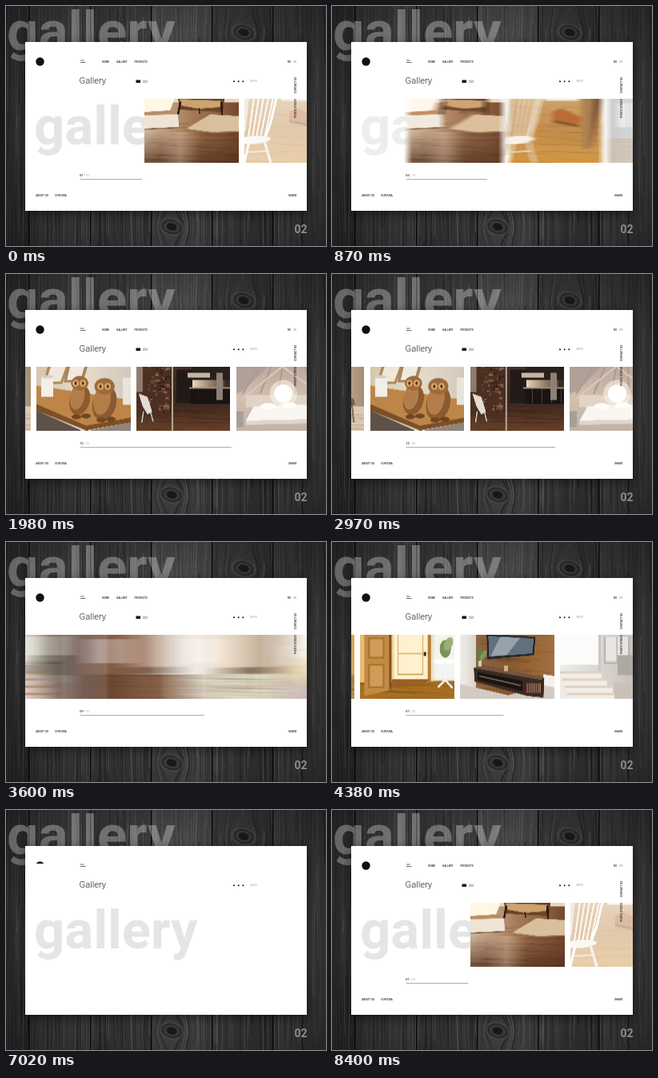
These frames come from a looping animation (400 by 300 pixels, 8.43 s). An HTML page with a canvas:

```html
<!DOCTYPE html>
<html lang="en">
<head>
<meta charset="utf-8">
<title>Gallery</title>
<style>
html, body { margin: 0; width: 100%; height: 100%; overflow: hidden; background: #222; }
canvas { display: block; width: 400px; height: 300px; }
</style>
</head>
<body>
<canvas id="stage" width="400" height="300"></canvas>
<script>
const LOOP = 8430;
const CARD = { x: 24, y: 45, w: 352, h: 211 };
const ITEM_W = 117.5, ITEM_H = 80, PITCH = 124.8, TOP = 115.5;
const START_X = 173, ACTIVE_X = 162.7;
const PAD = 60, SCALE = 3;
const FONT = 'Roboto, Arial, sans-serif';
const ctx = document.getElementById('stage').getContext('2d');

const clamp = v => Math.max(0, Math.min(1, v));
const span = (t, a, b) => clamp((t - a) / (b - a));
const mix = (a, b, k) => a + (b - a) * k;
const easeOut = p => 1 - Math.pow(1 - p, 3);
const inOut = (p, n) => p < .5 ? .5 * Math.pow(2 * p, n) : 1 - .5 * Math.pow(2 - 2 * p, n);

function layer(w, h) {
  const c = document.createElement('canvas');
  c.width = w;
  c.height = h;
  return c;
}

function random(seed) {
  return () => (seed = (seed * 16807) % 2147483647) / 2147483647;
}

// ---- drawing helpers ----
function rect(c, color, x, y, w, h) {
  c.fillStyle = color;
  c.fillRect(x, y, w, h);
}
function poly(c, color, ...p) {
  c.fillStyle = color;
  c.beginPath();
  for (let i = 0; i < p.length; i += 2) c.lineTo(p[i], p[i + 1]);
  c.fill();
}
function oval(c, color, x, y, rx, ry, turn = 0) {
  c.fillStyle = color;
  c.beginPath();
  c.ellipse(x, y, rx, ry, turn, 0, 7);
  c.fill();
}
function line(c, color, width, ...p) {
  c.strokeStyle = color;
  c.lineWidth = width;
  c.beginPath();
  for (let i = 0; i < p.length; i += 2) c.lineTo(p[i], p[i + 1]);
  c.stroke();
}
function fade(c, x, y, w, h, across, ...colors) {
  const g = across ? c.createLinearGradient(x, 0, x + w, 0) : c.createLinearGradient(0, y, 0, y + h);
  colors.forEach((col, i) => g.addColorStop(i / (colors.length - 1), col));
  rect(c, g, x, y, w, h);
}
function boards(c, y, color, seed) {
  const rnd = random(seed);
  for (let i = 0; i < 26; i++) {
    const yy = y + rnd() * (80 - y), x = rnd() * 100 - 20;
    c.globalAlpha = .08 + rnd() * .2;
    line(c, color, .6 + rnd(), x, yy, x + 30 + rnd() * 60, yy + 2);
  }
  c.globalAlpha = 1;
}

// ---- the pictures of the strip ----
function rugRoom(c) {
  fade(c, 0, 0, 118, 80, true, '#d9c4aa', '#a67a56', '#76492d');
  fade(c, 0, 36, 118, 44, false, 'rgba(90,50,28,0)', 'rgba(82,46,27,.75)');
  boards(c, 30, '#3c2113', 11);
  rect(c, '#e6d6bd', 0, 0, 118, 5);
  poly(c, '#fff6e4', 0, 0, 38, 0, 32, 15, 0, 17);
  poly(c, '#b98c63', 0, 17, 34, 15, 42, 22, 0, 21);
  poly(c, '#eee4d6', 0, 21, 42, 20, 43, 36, 0, 38);
  line(c, '#7d5236', 1.4, 0, 38.5, 43, 36.5);
  poly(c, '#6b4326', 42, 0, 100, 0, 98, 17, 44, 14);
  poly(c, '#caa36f', 44, 1, 96, 3, 94, 11, 68, 13, 46, 9);
  line(c, '#2d1a10', 2.4, 45, 4, 42, 20);
  line(c, '#2d1a10', 2.4, 96, 4, 97, 22);
  line(c, '#2d1a10', 1.6, 68, 12, 69, 19);
  poly(c, '#d9bf9c', 52, 38, 82, 20, 118, 22, 118, 41, 84, 42);
  line(c, '#a67c55', 1.2, 52, 38.5, 84, 42.5, 118, 41.5);
  fade(c, 20, 42, 50, 38, true, 'rgba(255,235,210,0)', 'rgba(255,235,210,.3)', 'rgba(255,235,210,0)');
}
function chairRoom(c) {
  fade(c, 0, 0, 118, 80, false, '#cda066', '#c08a48', '#d0943f');
  boards(c, 8, '#7c4d1c', 23);
  poly(c, '#b5682f', 56, 17, 66, 12, 92, 24, 88, 33, 56, 27);
  poly(c, '#80502a', 56, 27, 88, 33, 88, 36, 56, 30);
  poly(c, '#a8794d', 92, 0, 112, 0, 104, 62, 94, 64);
  poly(c, '#7b5433', 106, 0, 118, 0, 104, 62);
  rect(c, '#efe6d8', 46, 0, 42, 3);
  poly(c, '#dcd4c6', 0, 0, 6, 0, 2, 40, 0, 42);
  for (let i = 0; i < 5; i++) line(c, '#f7f4ee', 2, 12 + i * 6, 0, 5 + i * 5, 50);
  line(c, '#fff', 3, 40, 0, 33, 30, 26, 50);
  oval(c, '#f4f0e9', 12, 52, 21, 5, -.08);
  line(c, '#e9e3d9', 3.4, 25, 53, 33, 80);
  line(c, '#fbf9f5', 3.2, 6, 55, 0, 80);
  line(c, '#ded5c6', 2, 4, 67, 29, 66);
}
function owls(c) {
  fade(c, 0, 0, 118, 80, true, '#d6c6ae', '#e7dccb', '#d2c9bd');
  poly(c, '#b08a5b', 14, 0, 40, 0, 32, 22, 8, 22);
  poly(c, '#efe7da', 18, 0, 37, 0, 30, 19, 12, 19);
  poly(c, '#a8855c', 38, 0, 64, 0, 58, 20, 34, 20);
  poly(c, '#f0e9df', 42, 0, 60, 0, 55, 17, 38, 17);
  poly(c, '#bd8648', 0, 24, 118, 42, 118, 64, 62, 74, 0, 47);
  poly(c, '#7d4f27', 0, 47, 62, 74, 118, 64, 118, 70, 62, 80, 0, 55);
  poly(c, '#5e5148', 0, 55, 56, 80, 0, 80);
  poly(c, '#8f857b', 66, 80, 118, 70, 118, 80);
  rect(c, '#f2eee8', 6, 13, 15, 25);
  oval(c, '#d8d0c5', 13.5, 13, 7.5, 2);
  rect(c, '#e8e3db', 108, 14, 10, 34);
  for (const [x, y, s] of [[54, 34, .9], [85, 38, 1.05]]) {
    oval(c, '#8a5a30', x, y + 8, 14 * s, 21 * s, .25);
    oval(c, '#b27d48', x - 3, y + 4, 10 * s, 18 * s, .2);
    oval(c, '#9d6a3a', x, y - 13, 12 * s, 10 * s);
    oval(c, '#d3a46c', x - 5, y - 13, 4, 4.5);
    oval(c, '#d3a46c', x + 4, y - 13, 4, 4.5);
    oval(c, '#4a2c16', x - 5, y - 13, 1.5, 1.8);
    oval(c, '#4a2c16', x + 4, y - 13, 1.5, 1.8);
    oval(c, '#70451f', x - 4, y + 29, 6, 3);
    oval(c, '#70451f', x + 8, y + 28, 6, 3);
  }
}
function kitchen(c) {
  fade(c, 0, 0, 118, 80, false, '#443029', '#38251d', '#694128');
  boards(c, 48, '#27140c', 31);
  poly(c, '#4b2f22', 0, 0, 42, 0, 42, 68, 0, 60);
  const rnd = random(7);
  for (let i = 0; i < 60; i++) {
    const tone = ['#8a6248', '#33201a', '#6c4733'][i % 3];
    rect(c, tone, 12 + rnd() * 26, rnd() * 56, 2 + rnd() * 4, 1 + rnd() * 3);
  }
  rect(c, '#8f7b6b', 0, 0, 8, 32);
  rect(c, '#b6a594', 44, 0, 2, 80);
  rect(c, '#221a18', 50, 4, 22, 42);
  rect(c, '#27201d', 70, 0, 48, 17);
  fade(c, 70, 17, 40, 9, true, '#e9dbc4', '#a48a70', '#5d4637');
  rect(c, '#c6b5a2', 64, 8, 28, 6);
  rect(c, '#191312', 68, 27, 50, 20);
  rect(c, '#a59586', 66, 26, 52, 1.6);
  for (let x = 78; x < 118; x += 12) line(c, '#5c4a41', .6, x, 28, x, 46);
  rect(c, '#8d8177', 100, 8, 8, 34);
  poly(c, '#e3ddd5', 3, 34, 14, 38, 20, 57, 14, 60, 8, 50);
  line(c, '#cfc6bc', 1.5, 9, 56, 7, 70);
  line(c, '#cfc6bc', 1.5, 18, 57, 21, 69);
}
function bedroom(c) {
  fade(c, 0, 0, 118, 80, false, '#6d4328', '#9b7250', '#7a563a');
  poly(c, '#4f2f1c', 0, 0, 40, 0, 10, 30, 0, 34);
  for (let i = 0; i < 6; i++) line(c, '#3e2415', 2, 30 + i * 14, 0, 8 + i * 22, 34);
  line(c, '#b88a5e', 2, 58, 0, 8, 40);
  line(c, '#b88a5e', 2, 58, 0, 112, 40);
  rect(c, '#bda083', 12, 36, 94, 15);
  oval(c, 'rgba(255,238,205,.55)', 59, 34, 17, 17);
  oval(c, '#fff', 59, 34, 11.5, 11.5);
  poly(c, '#f1e9df', 22, 50, 88, 48, 100, 66, 12, 68);
  poly(c, '#b7a493', 12, 68, 100, 66, 100, 71, 12, 73);
  oval(c, '#fffaf2', 40, 50, 10, 4);
  oval(c, '#fffaf2', 66, 49, 10, 4);
  rect(c, '#3d2819', 0, 56, 9, 20);
}
function doorRoom(c) {
  fade(c, 0, 0, 118, 80, true, '#e8bd70', '#f3dfad', '#e6e6df');
  poly(c, '#a97023', 0, 60, 118, 58, 118, 80, 0, 80);
  boards(c, 60, '#5f3913', 43);
  poly(c, '#c28a43', 5, 0, 36, 0, 36, 70, 5, 77);
  rect(c, '#a87131', 10, 4, 20, 26);
  rect(c, '#d09d57', 12, 6, 16, 22);
  rect(c, '#a87131', 10, 37, 20, 30);
  rect(c, '#d09d57', 12, 39, 16, 26);
  rect(c, '#7d5120', 36, 0, 3, 68);
  rect(c, '#fff1cf', 42, 0, 42, 56);
  line(c, '#d4ac66', 1.4, 47, 0, 47, 50, 78, 50, 78, 0);
  line(c, '#d4ac66', 1.2, 47, 24, 78, 24);
  rect(c, '#b67c37', 84, 0, 4, 60);
  rect(c, '#3b2919', 79, 22, 3, 5);
  poly(c, '#9b5f25', 40, 56, 88, 56, 78, 62, 38, 63);
  rect(c, '#f3f3ef', 92, 0, 26, 56);
  oval(c, '#7c9256', 106, 18, 7, 11);
  oval(c, '#9cae78', 110, 12, 5, 9, .4);
  oval(c, '#fff', 105, 34, 14, 3.4);
  line(c, '#f6f6f3', 2.4, 106, 34, 106, 57, 97, 66);
  line(c, '#f6f6f3', 2.4, 106, 57, 115, 67);
}
function tvRoom(c) {
  fade(c, 0, 0, 118, 80, true, '#8f6c4c', '#87592f', '#a3713f');
  boards(c, 0, '#4b2d16', 59);
  fade(c, 0, 0, 20, 68, true, '#f1eeea', '#d9d3cb');
  poly(c, '#d3cbc3', 0, 62, 60, 76, 118, 60, 118, 80, 0, 80);
  poly(c, '#f4f1ed', 104, 50, 118, 52, 118, 66, 104, 64);
  poly(c, '#1f2226', 33, 0, 94, 3, 92, 26, 34, 31);
  poly(c, '#62717c', 35, 2, 92, 5, 90, 24, 36, 28);
  poly(c, 'rgba(230,238,242,.4)', 50, 3, 75, 4, 58, 26, 38, 27);
  poly(c, '#3a2a21', 17, 42, 28, 38, 105, 54, 104, 79, 84, 77, 18, 59);
  poly(c, '#735540', 17, 42, 28, 38, 105, 54, 101, 57);
  poly(c, '#191412', 22, 47, 78, 58, 78, 71, 22, 57);
  for (let i = 0; i < 8; i++) rect(c, i % 3 ? '#887b72' : '#a44d38', 83 + i * 2.3, 61, 1.5, 12);
  line(c, '#a79788', 1, 24, 52, 76, 64);
  rect(c, '#d8c9b9', 23, 30, 4, 10);
  oval(c, '#667a43', 24, 25, 4, 8);
  oval(c, '#819556', 29, 26, 3, 7, .5);
  rect(c, '#c9b091', 55, 39, 5, 7);
}
function stairs(c) {
  fade(c, 0, 0, 118, 80, true, '#dbd5ce', '#a69a8d', '#61594e');
  rect(c, '#f7f6f3', 0, 0, 50, 38);
  rect(c, '#8d8377', 48, 0, 3, 50);
  rect(c, '#c8c6be', 56, 3, 30, 30);
  line(c, '#675545', 2, 56, 3, 56, 36, 86, 36, 86, 3);
  line(c, '#675545', 1.2, 71, 3, 71, 36);
  rect(c, '#484239', 72, 26, 20, 25);
  for (let i = 0; i < 4; i++) {
    rect(c, '#ba9a76', i * 3, 46 + i * 9, 52 + i * 4, 3);
    rect(c, '#e3d7c9', i * 3, 49 + i * 9, 52 + i * 4, 6);
  }
  rect(c, '#877460', 68, 61, 50, 19);
  rect(c, '#564b3f', 92, 0, 26, 80);
}
function room(tones, floor, seed) {
  return c => {
    fade(c, 0, 0, 118, 80, true, ...tones);
    fade(c, 0, 50, 118, 30, true, floor, tones[1]);
    boards(c, 50, '#4b301e', seed);
    rect(c, 'rgba(255,255,255,.55)', 12, 6, 30, 30);
    line(c, 'rgba(90,65,45,.6)', 1.5, 27, 6, 27, 36);
    poly(c, 'rgba(70,46,30,.55)', 50, 42, 104, 40, 106, 48, 50, 50);
    line(c, 'rgba(70,46,30,.6)', 2, 54, 49, 52, 72);
    line(c, 'rgba(70,46,30,.6)', 2, 102, 47, 104, 70);
  };
}

const pictures = [
  rugRoom, chairRoom,
  room(['#8f989b', '#b5b3ac', '#d8d3ca'], '#9a7a59', 61),
  room(['#b7a084', '#e2d6c4', '#8a6b50'], '#8d6440', 67),
  room(['#d9c9ae', '#b98d55', '#d9a95f'], '#94622f', 71),
  doorRoom, tvRoom, stairs,
  room(['#694630', '#8a6146', '#f1eeea'], '#553320', 73),
  room(['#efede9', '#dac9b4', '#a68d74'], '#d8cabb', 79),
  owls, kitchen, bedroom,
  room(['#bca58c', '#846850', '#ddd2c3'], '#775238', 83)
].map(paint => {
  const pic = layer(ITEM_W * SCALE, ITEM_H * SCALE), c = pic.getContext('2d');
  c.scale(SCALE, SCALE);
  paint(c);
  return pic;
});

// ---- dark boards behind the card ----
function makeWood() {
  const wood = layer(400, 300), c = wood.getContext('2d'), rnd = random(4242);
  const knots = [[297, 33], [207, 276]], seams = [28, 105, 181, 257, 333];
  rect(c, '#414141', 0, 0, 400, 300);
  [0, ...seams].forEach((x, i) => rect(c, i % 2 ? 'rgba(255,255,255,.04)' : 'rgba(0,0,0,.06)', x, 0, 77, 300));
  for (let n = 0; n < 620; n++) {
    const x0 = rnd() * 400, ph = rnd() * 6, y0 = rnd() * 300 - 60, len = 60 + rnd() * 240;
    const tone = rnd() < .55 ? '0,0,0' : '165,165,165';
    c.strokeStyle = `rgba(${tone},${.06 + rnd() * .24})`;
    c.lineWidth = .4 + rnd() * 1.1;
    c.beginPath();
    for (let y = y0; y < y0 + len; y += 5) {
      let x = x0 + Math.sin(y / 45 + ph) * 1.2;
      for (const [kx, ky] of knots) {
        const d = x0 - kx;
        x += Math.sign(d) * 13 * Math.exp(-Math.pow((y - ky) / 18, 2) - Math.abs(d) / 15);
      }
      c.lineTo(x, y);
    }
    c.stroke();
  }
  for (const [x, y] of knots) {
    for (let r = 16; r > 2; r -= 3) oval(c, r % 2 ? 'rgba(20,20,20,.5)' : 'rgba(95,95,95,.4)', x, y, r, r * .7, .25);
    oval(c, '#1c1c1c', x, y, 6, 4, .3);
  }
  for (const x of seams) {
    rect(c, '#0d0d0d', x, 0, 1.6, 300);
    rect(c, 'rgba(255,255,255,.08)', x + 1.6, 0, 1, 300);
  }
  const g = c.createRadialGradient(200, 140, 90, 200, 150, 260);
  g.addColorStop(0, 'rgba(0,0,0,0)');
  g.addColorStop(1, 'rgba(0,0,0,.55)');
  rect(c, g, 0, 0, 400, 300);
  text(c, 'gallery', 1, 55, 69, 'rgba(255,255,255,.3)', 700);
  text(c, '02', 360.5, 283.5, 14, '#8c8c8c', 700);
  c.shadowColor = 'rgba(0,0,0,.55)';
  c.shadowBlur = 14;
  c.shadowOffsetY = 4;
  rect(c, '#fff', CARD.x, CARD.y, CARD.w, CARD.h);
  return wood;
}
function text(c, s, x, y, size, color, weight = 400) {
  c.font = `${weight} ${size}px ${FONT}`;
  c.fillStyle = color;
  c.fillText(s, x, y);
}
const wood = makeWood();

// ---- motion ----
const FIRST = START_X - ACTIVE_X + 11 * PITCH, SECOND = START_X - ACTIVE_X + 6 * PITCH;
function scrollAt(t) {
  if (t >= 5400) return t < 6600 ? SECOND : 0;
  return t < 2340 ? FIRST * inOut(t / 2340, 7.4)
    : mix(FIRST, SECOND, inOut(span(t, 2340, 4860), 5));
}
function progressAt(t) {
  if (t >= 6600) return { bar: 78, num: 1 };
  if (t < 2340) {
    const k = inOut(t / 2340, 3);
    return { bar: mix(78, 191, k), num: mix(1, 12, k) };
  }
  const k = inOut(span(t, 2340, 4860), 3);
  return { bar: mix(191, 120, k), num: mix(12, 7, k) };
}
// 1 = fully shown; every part comes back from its own start time
const shown = (t, start, time = 300) => t < 6500 ? 1 : easeOut(span(t, start, start + time));

function reveal(k, x, y, w, h, draw) {
  if (k <= 0) return;
  ctx.save();
  if (k < 1) {
    ctx.beginPath();
    ctx.rect(x, y, w, h * k);
    ctx.clip();
  }
  draw();
  ctx.restore();
}
function label(t, start, s, x, y, size, color = '#222', weight = 500) {
  reveal(shown(t, start), x - 1, y - size, 60, size * 1.35, () => text(ctx, s, x, y, size, color, weight));
}

const strip = layer(CARD.w + 2 * PAD, ITEM_H), smear = layer(CARD.w, ITEM_H);
const sc = strip.getContext('2d'), mc = smear.getContext('2d');

function drawStrip(t) {
  const scroll = scrollAt(t);
  const speed = t < 4860 ? Math.abs(scrollAt(t + 5) - scrollAt(Math.max(0, t - 5))) / 10 : 0;
  const blur = Math.min(80, 30 * speed ** 3);
  sc.clearRect(0, 0, strip.width, ITEM_H);
  pictures.forEach((pic, i) => {
    const x = START_X + i * PITCH - scroll, left = x - CARD.x + PAD;
    if (left > strip.width || left < -ITEM_W) return;
    const k = shown(t, 7120 + i * 120, 520);
    if (k <= 0) return;
    sc.globalAlpha = mix(1, .45, span(x, 225, 285));
    sc.drawImage(pic, 0, 0, Math.max(1, pic.width * k), pic.height, left, 0, ITEM_W * k, ITEM_H);
  });
  sc.globalAlpha = 1;
  mc.clearRect(0, 0, CARD.w, ITEM_H);
  const n = blur < 1 ? 1 : Math.min(20, Math.ceil(blur / 2) + 2);
  mc.globalCompositeOperation = 'lighter';
  mc.globalAlpha = 1 / n;
  for (let i = 0; i < n; i++) {
    const dx = n > 1 ? (i / (n - 1) - .5) * blur : 0;
    mc.drawImage(strip, dx - PAD, 0);
  }
  ctx.drawImage(smear, CARD.x, TOP);
  if (t >= 5400 && t < 6500) {
    rect(ctx, `rgba(0,0,0,${.2 * span(t, 5400, 5580)})`, ACTIVE_X, TOP, ITEM_W, ITEM_H);
  }
}

function drawHeader(t) {
  reveal(shown(t, 6990), 36, 64, 13, 11, () => oval(ctx, '#111', 42.5, 69.5, 5.2, 5.2));
  reveal(shown(t, 6850), 92, 67, 8, 5, () => {
    rect(ctx, '#444', 93, 67.6, 4.5, .8);
    rect(ctx, '#444', 93, 70, 6.5, .8);
  });
  label(t, 7060, 'HOME', 120, 70.5, 3.2);
  label(t, 7110, 'GALLERY', 138, 70.5, 3.2);
  label(t, 7160, 'PRODUCTS', 160.5, 70.5, 3.2);
  label(t, 7210, 'RU', 352, 70.5, 3.2);
  label(t, 7210, 'EN', 359, 70.5, 3.2, '#aaa');
  label(t, 6830, 'Gallery', 91.5, 97.3, 11.2, '#222', 300);
  reveal(shown(t, 7080), 162, 92, 16, 5, () => {
    rect(ctx, '#111', 162.5, 92.5, 5.5, 3.5);
    rect(ctx, '#c8c8c8', 171, 92.5, 6, 3.5);
  });
  reveal(shown(t, 6820), 283, 92, 16, 4, () => {
    for (let i = 0; i < 3; i++) oval(ctx, '#111', 285 + i * 5.7, 94.2, 1, 1);
  });
  label(t, 6900, 'MORE', 305.5, 95.4, 3.2, '#aaa', 400);
}

function sideText(t, start, s, y) {
  reveal(shown(t, start), 358, y - 32, 8, 34, () => {
    ctx.translate(363.2, y);
    ctx.rotate(-Math.PI / 2);
    text(ctx, s, 0, 0, 3.4, '#222', 500);
  });
}

function drawFooter(t) {
  const { bar, num } = progressAt(t);
  label(t, 7260, String(Math.floor(num + .35)).padStart(2, '0'), 92.3, 212.9, 3.8);
  label(t, 7260, '/ 25', 97.6, 212.9, 3.8, '#aaa', 400);
  rect(ctx, '#999', 92.5, 216.3, bar * shown(t, 7260, 450), .9);
  label(t, 7350, 'ABOUT US', 37.3, 237.6, 3.3);
  label(t, 7400, 'OUR IDEA', 61.3, 237.6, 3.3);
  label(t, 7400, 'SHARE', 353, 237.6, 3.3);
}

// the chosen picture grows over the card, then clears to white
function drawZoom(t) {
  if (t < 6000 || t > 6840) return;
  const k = inOut(span(t, 6000, 6500), 4), pic = pictures[6];
  const x = mix(ACTIVE_X, CARD.x, k), y = mix(TOP, CARD.y, k);
  const w = mix(ITEM_W, CARD.w, k), h = mix(ITEM_H, CARD.h, k);
  const sh = Math.min(pic.height, pic.width * h / w);
  ctx.save();
  ctx.globalAlpha = 1 - span(t, 6520, 6820);
  ctx.drawImage(pic, 0, (pic.height - sh) / 2, pic.width, sh, x, y, w, h);
  rect(ctx, 'rgba(0,0,0,.2)', x, y, w, h);
  ctx.restore();
}

function draw(t) {
  ctx.drawImage(wood, 0, 0);
  ctx.save();
  ctx.beginPath();
  ctx.rect(CARD.x, CARD.y, CARD.w, CARD.h);
  ctx.clip();
  const ghost = t < 6500 ? 1 - span(t, 600, 1500) : span(t, 6640, 6900);
  if (ghost > 0) {
    ctx.globalAlpha = ghost;
    text(ctx, 'gallery', 35, 173, 67, '#e5e5e5', 700);
    ctx.globalAlpha = 1;
  }
  drawStrip(t);
  drawHeader(t);
  sideText(t, 7300, 'CONTACT US', 109);
  sideText(t, 7350, 'PHOTO STUDIO', 140);
  drawFooter(t);
  drawZoom(t);
  ctx.restore();
}

const begin = performance.now();
function tick() {
  draw((performance.now() - begin) % LOOP);
  requestAnimationFrame(tick);
}
tick();
</script>
</body>
</html>
```
